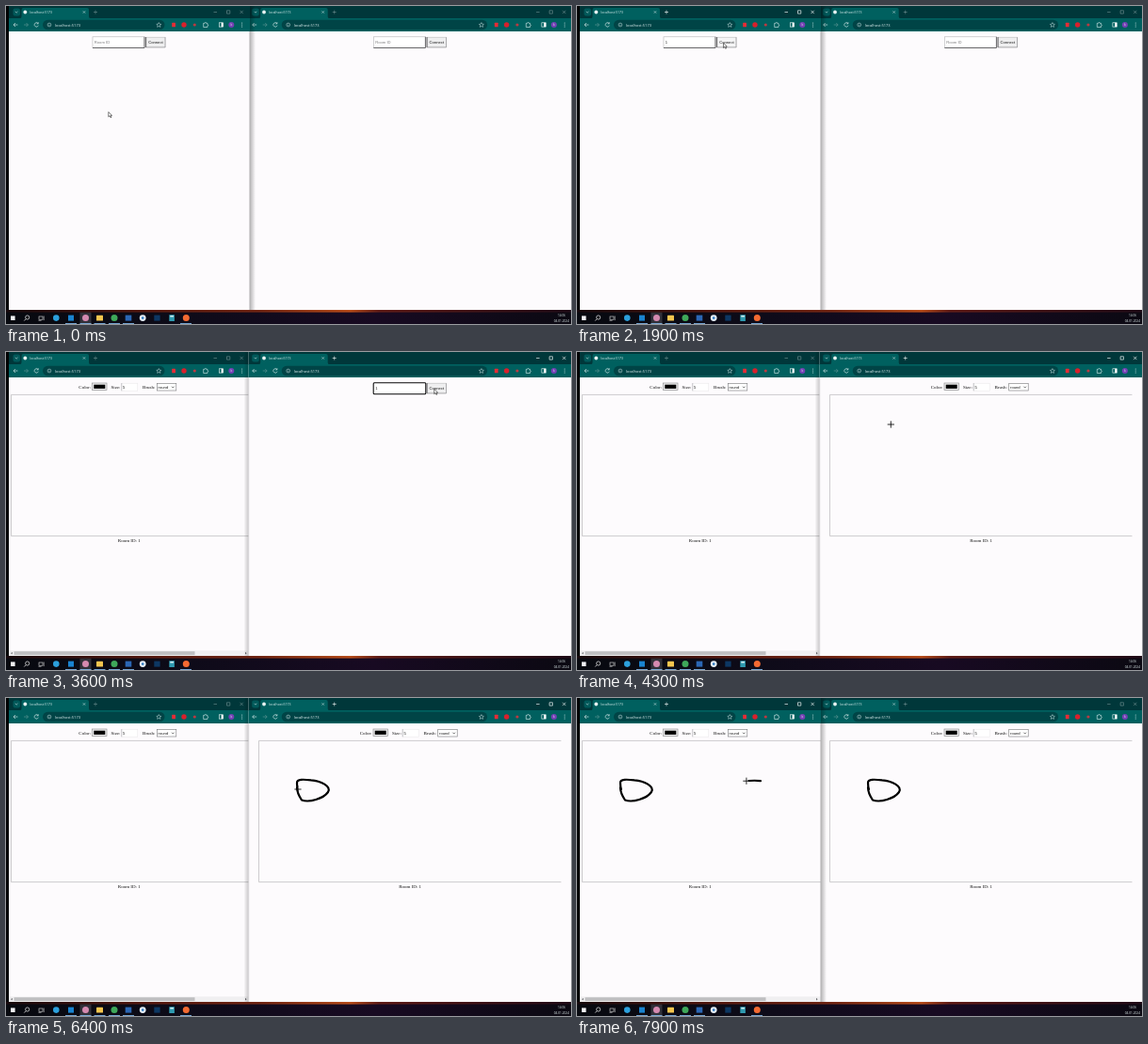
An HTML page that plays this animation: 600x338 px, repeating every 8000 ms.

```html
<!DOCTYPE html>
<html lang="en">
<head>
<meta charset="utf-8">
<title>Shared drawing room</title>
<style>
  html, body { margin: 0; width: 100%; height: 100%; overflow: hidden; background: #000; }
  svg { display: block; width: 100vw; height: 100vh; }
  text { white-space: pre; }
  .ui { font-family: "Open Sans", "Noto Sans", sans-serif; fill: #e4f1f1; }
  .form { font: 4.17px "Liberation Sans", Arial, sans-serif; }
  .page { font: 5px "Liberation Serif", "Times New Roman", serif; fill: #111; }
</style>
</head>
<body>
<svg id="stage" viewBox="0 0 600 338" preserveAspectRatio="none" xmlns="http://www.w3.org/2000/svg"></svg>
<script>
const LOOP = 8000;
const stage = document.getElementById('stage');

// Markup helpers
const rect = (x, y, w, h, fill, more = '') =>
  `<rect x="${x}" y="${y}" width="${w}" height="${h}" fill="${fill}" ${more}/>`;
const dot = (x, y, r, fill, more = '') => `<circle cx="${x}" cy="${y}" r="${r}" fill="${fill}" ${more}/>`;
const line = (d, color, w = 0.6, more = '') =>
  `<path d="${d}" fill="none" stroke="${color}" stroke-width="${w}" ${more}/>`;
const text = (x, y, s, cls, more = '') => `<text x="${x}" y="${y}" class="${cls}" ${more}>${s}</text>`;
const group = (id, body, more = '') => `<g id="${id}" ${more}>${body}</g>`;

const SHAPE = 'M309 95C309 99 311 104 314 108.5C322 111.5 337 107 342 100' +
  'C346 94 334 88 324 87.3C316 86.5 309 86 309 90C309 93 309.3 95 310 97';
const DASH = 'M195 88.2C190 87.4 186 87.7 180 88.2L174 88.8';
const stroke = (id, d, more = '') =>
  line(d, '#000', 2.2, `id="${id}" stroke-linecap="round" stroke-linejoin="round" ${more}`);

// Title strip and toolbar; dx shifts the left-hand items, rx the right-hand ones
function chrome(id, x0, x1, dx, rx) {
  const X = n => n + dx, R = n => n + rx, ink = '#d5e8e8';
  return rect(x0, 0, x1 - x0, 13.5, '#00373a') +
    rect(x0, 13, x1 - x0, 14, '#00605f') +
    rect(X(7.5), 2.5, 7.5, 8, '#00595a', 'rx="2"') +
    line(`M${X(9.8)} 5.8l1.4 1.4l1.4 -1.4`, ink) +
    `<path d="M${X(14.5)} 13.2q2 0 2-2V4q0-2 2-2h67.500q2 0 2 2v7.200q0 2 2 2z" fill="#00605f"/>` +
    dot(X(20.3), 6.5, 1.9, '#e8f2f2') +
    text(X(25.3), 8, 'localhost:5173', 'ui', 'font-size="3.5"') +
    line(`M${X(81.8)} 5.3l2.400 2.400m0 -2.400l-2.400 2.400`, ink, 0.55) +
    group(id + 'Ctl',
      line(`M${X(93)} 6.500h4m-2 -2v4`, '#fff', 0.6) +
      line(`M${R(220.5)} 6.500h3.500M${R(234.5)} 4.800h3.300v3.300h-3.300zM${R(248.5)} 4.800l3.300 3.300m0 -3.300l-3.300 3.300`, '#fff', 0.65)) +
    line(`M${X(12.5)} 20h-4.500m2 -2l-2 2l2 2`, ink, 0.65) +
    line(`M${X(19)} 20h4.500m-2 -2l2 2l-2 2`, '#5d9594', 0.65) +
    line(`M${X(34.2)} 18.700a2.200 2.200 0 1 0 .2 2m-.2 -3.500v1.700h-1.700`, ink, 0.65) +
    rect(X(39), 14.7, R(168.5) - X(39), 10.6, '#004446', 'rx="5.3"') +
    dot(X(46), 20, 1.9, 'none', `stroke="${ink}" stroke-width=".5"`) +
    line(`M${X(46)} 19.700v1.300M${X(46)} 18.700v.4`, ink, 0.5) +
    text(X(52), 21.5, 'localhost:5173', 'ui', 'font-size="4"') +
    line(`M${R(162.3)} 17.600l.75 1.600l1.750 .2l-1.300 1.200l.35 1.750l-1.550 -.9l-1.550 .9l.35 -1.750l-1.300 -1.200l1.750 -.2z`, ink, 0.5) +
    rect(R(176.2), 17.7, 3.8, 4.6, '#e52c36', 'rx=".5"') +
    dot(R(189), 20, 2.7, '#d8202c') +
    dot(R(200.3), 20, 1.6, '#b93a42') +
    line(`M${R(209.7)} 18.300h1.400a.8 .8 0 0 1 1.600 0h1.200v1.300a.8 .8 0 0 1 0 1.600v1.300h-4.200z`, ink, 0.65) +
    rect(R(226.3), 17.8, 4.3, 4.3, 'none', 'stroke="#fff" stroke-width=".6"') +
    rect(R(228.6), 17.8, 2, 4.3, '#fff') +
    dot(R(239.3), 19.9, 3, '#7540b5') +
    text(R(239.3), 21.2, 'k', 'ui', 'font-size="3.4" text-anchor="middle"') +
    [18, 20, 22].map(y => dot(R(250.6), y, 0.5, ink)).join('');
}

// Form for entering the room
function joinForm(id, p) {
  return group(id + 'Join',
    rect(92, 32.8, 55, 11.7, '#fff', 'stroke="#b4b4b6" stroke-width=".6"') +
    line('M92 44.500H147V32.800', '#5b5b5d', 0.9) +
    rect(91.8, 32.8, 55.6, 12, '#fff', `id="${id}Ring" rx="1" stroke="#111" stroke-width="1.1"`) +
    text(93.8, 40.2, 'Room ID', 'form', `id="${id}Hint" fill="#7b7b7d"`) +
    text(93.8, 40.2, '1', 'form', `id="${id}Value" fill="#222"`) +
    line('M93.500 36v5', '#111', 0.4, `id="${id}Caret"`) +
    rect(148.8, 33.2, 20.2, 10.6, '#efeff0', `id="${id}Btn" stroke="#b9b9bb" stroke-width=".6"`) +
    line('M148.600 33v11', '#58585a', 0.9) +
    line('M148.600 44h20.500v-10.800', '#87878a', 0.5) +
    text(158.9, 40.1, 'Connect', 'form', 'text-anchor="middle" fill="#111"'),
    `transform="translate(${p} 0)"`);
}

// Brush settings above the canvas
function tools(p) {
  return `<g transform="translate(${p} 0)">` +
    text(77.3, 38.9, 'Color:', 'page') +
    rect(91.6, 33, 15.4, 7.6, '#efeff0', 'stroke="#858587" stroke-width=".6"') +
    rect(93.3, 34.7, 12, 4.2, '#000') +
    text(111.5, 38.9, 'Size:', 'page') +
    rect(122.8, 33.2, 17, 8, '#fff', 'stroke="#e6e4e7" stroke-width=".5"') +
    line('M122.800 33v8.300', '#a5a5a8', 0.6) +
    text(124, 38.7, '5', 'form', 'fill="#111"') +
    text(145.1, 38.9, 'Brush:', 'page') +
    rect(160.3, 33.6, 20.5, 7.4, '#fff', 'stroke="#77777a" stroke-width=".6"') +
    text(161.6, 38.6, 'round', 'form', 'fill="#111"') +
    line('M176 36.700l1.300 1.300l1.300 -1.300', '#111', 0.6) +
    text(118.8, 201.8, 'Room ID: 1', 'page') + '</g>';
}

const frameLine = d => line(d, '#b9b8bb', 0.7);

const leftWindow = () =>
  rect(259, 0, 6, 323, 'url(#shadeR)') +
  rect(3, 0, 256, 323, '#fdfbfd') +
  chrome('left', 3, 259, 0, 0) +
  joinForm('left', 0) +
  group('leftRoom', tools(0) +
    frameLine('M259 45.400H5.500V195.600H259') +
    stroke('copy', SHAPE, 'transform="translate(-263 0)"') +
    stroke('dash', DASH) +
    rect(3, 317.4, 256, 5.4, '#f0eff1') +
    rect(8.5, 318.2, 192, 3.9, '#bfbfc1') +
    '<path d="M6.700 318.800v2.800l-1.600 -1.400zM254 318.800v2.800l1.600 -1.400z" fill="#66666a"/>') +
  line('M258.700 27V323', '#a9a8ab', 0.6);

const rightWindow = () =>
  rect(252.5, 0, 5, 323, 'url(#shadeL)') +
  rect(257.5, 0, 342.5, 323, '#fdfbfd') +
  chrome('right', 257.5, 600, 253.7, 342.6) +
  joinForm('right', 298.4) +
  group('rightRoom', tools(298.4) +
    frameLine('M589.500 45.400H268.500V195.600H589.500') +
    stroke('blob', SHAPE)) +
  line('M257.700 27V323', '#b3b2b5', 0.5);

function taskbar() {
  const y = 331.6, running = [69, 84.5, 99.5, 115, 130, 191];
  return rect(0, 323, 600, 15, 'url(#bar)') +
    rect(0, 323, 600, 2.6, 'url(#glow)') +
    rect(5, 329.4, 4.6, 4.6, '#f2f2f4') +
    dot(22.7, 331, 2.1, 'none', 'stroke="#eee" stroke-width=".7"') +
    line(`M21.200 332.600l-1.900 1.900`, '#eee', 0.8) +
    rect(35, 330, 4, 3.2, 'none', 'stroke="#ddd" stroke-width=".6"') +
    line('M34.500 334.300h3M40.200 329.500v4.600', '#ddd', 0.6) +
    dot(53.3, y, 3.3, '#2ca0dc') +
    rect(66, 328.6, 6, 6, '#1983d0') +
    rect(78.5, 325.7, 12, 12.3, '#ffffff', 'opacity=".16"') +
    dot(84.5, y, 3.5, '#d58ab0') +
    rect(96, 328.8, 7, 5.6, '#f4c64f', 'rx=".5"') +
    dot(115, y, 3.5, '#3fa85a') +
    rect(126.7, 328.6, 6.6, 6, '#2b67b5') +
    dot(145.2, y, 3.4, '#e6f0f8') + dot(145.2, y, 1.3, '#2a78c0') +
    rect(157.3, 328.6, 6.3, 6, '#0d3763') +
    rect(173.3, 328.2, 5.6, 6.8, '#2f9ab0') +
    rect(174.3, 329, 3.6, 1.5, '#d9f2f5') +
    dot(191.3, y, 3.5, '#f36a32') +
    running.map(x => rect(x - 6, 337.1, 12, 0.9, '#7fb3e2')).join('') +
    text(590, 330.2, '14:06', 'ui', 'font-size="3.2" text-anchor="middle"') +
    text(598, 336, '04.01.2024', 'ui', 'font-size="3.2" text-anchor="end"');
}

const fade = (id, stops) => `<linearGradient id="${id}">` +
  stops.map(([o, c, a = 1]) => `<stop offset="${o}" stop-color="${c}" stop-opacity="${a}"/>`).join('') +
  '</linearGradient>';

stage.innerHTML = '<defs>' +
  fade('shadeR', [[0, '#000', 0.28], [1, '#000', 0]]) +
  fade('shadeL', [[0, '#000', 0], [1, '#000', 0.2]]) +
  fade('bar', [[0, '#07090f'], [0.3, '#0d0b18'], [0.65, '#180a22'], [1, '#0b0912']]) +
  fade('glow', [[0, '#16080c'], [0.25, '#54180f'], [0.45, '#6f2412'], [0.61, '#b44a18'], [0.66, '#5e1b16'], [1, '#1f0a16']]) +
  '</defs>' + rect(0, 0, 600, 338, '#020304') + taskbar() +
  group('windows', group('right', rightWindow()) + group('left', leftWindow())) +
  group('pointer',
    group('arrow', '<path d="M0 0V5.200l1.250 -1.150l.95 2l.9 -.4l-.9 -1.950h1.600z" fill="#fff" stroke="#111" stroke-width=".55"/>') +
    group('beam', line('M-1.200 -2.600q1.200 0 1.200 .6q0 -.6 1.200 -.6M0 -2v4M-1.200 2.600q1.200 0 1.200 -.6q0 .6 1.200 .6', '#222', 0.5)) +
    group('cross', line('M-3.600 0h7.200M0 -3.600v7.200', '#111', 0.9)));

const el = id => document.getElementById(id);
const show = (id, on) => el(id).setAttribute('display', on ? 'inline' : 'none');
const clamp = v => Math.min(1, Math.max(0, v));
const between = (t, a, b) => t >= a && t < b;

// Pointer stops: time, x, y
const STOPS = [
  [0, 108.8, 112.6], [80, 108.8, 112.6], [550, 114, 39], [1250, 114, 39], [1800, 155.5, 39.3],
  [2100, 155.5, 39.3], [2800, 402, 37.5], [3250, 402, 37.5], [3650, 457, 39.5], [3850, 457, 39.5],
  [4300, 333.3, 77], [4500, 333.3, 77], [5150, 309, 95], [5380, 309, 95],
  [6400, 310, 97], [6600, 310, 97], [7350, 195, 88.2], [8000, 195, 88.2]
];
const LAG = 40;
const pens = { blob: [5380, 6400], dash: [7650, 8000] };
const size = {};
for (const id in pens) size[id] = el(id).getTotalLength();
const drawn = (id, t) => size[id] * clamp((t - pens[id][0]) / (pens[id][1] - pens[id][0]));

function pointerAt(t) {
  for (const id in pens) {
    if (between(t, ...pens[id])) {
      const p = el(id).getPointAtLength(drawn(id, t));
      return [p.x, p.y];
    }
  }
  const i = Math.max(1, STOPS.findIndex(s => s[0] > t));
  const [t0, x0, y0] = STOPS[i - 1], [t1, x1, y1] = STOPS[i];
  const k = clamp((t - t0) / (t1 - t0)), e = k * k * (3 - 2 * k);
  return [x0 + (x1 - x0) * e, y0 + (y1 - y0) * e];
}

function paintForm(id, t, focus, typed, press, open) {
  const active = between(t, focus, press), filled = t >= typed;
  show(id + 'Join', t < open);
  show(id + 'Room', t >= open);
  show(id + 'Ring', active);
  show(id + 'Hint', !filled);
  show(id + 'Value', filled);
  show(id + 'Caret', active && !filled);
  el(id + 'Btn').setAttribute('fill', between(t, press, open) ? '#f5f5f6' : '#efeff0');
}

function setFront(id) {
  const box = el('windows');
  if (box.lastElementChild.id !== id) box.appendChild(el(id));
}

function paint(t) {
  const focus = t < 600 ? '' : between(t, 2900, 7650) ? 'right' : 'left';
  setFront(focus || 'left');
  for (const id of ['left', 'right']) el(id + 'Ctl').setAttribute('opacity', focus === id ? 1 : 0.42);
  paintForm('left', t, 600, 1000, 1850, 2100);
  paintForm('right', t, 2900, 3300, 3700, 3850);

  for (const id in pens) {
    const n = drawn(id, t - LAG);
    show(id, n > 0);
    el(id).setAttribute('stroke-dasharray', `${n} ${size[id] + 10}`);
  }
  show('copy', t >= 6600);

  const [x, y] = pointerAt(t);
  const inField = y > 33 && y < 45 &&
    (t < 2100 && x > 92 && x < 147 || t < 3850 && x > 390 && x < 446);
  const onCanvas = y > 45.4 && y < 195.6 &&
    (t >= 3850 && x > 268 && x < 590 || t >= 2100 && x > 5 && x < 258);
  show('beam', inField);
  show('cross', onCanvas);
  show('arrow', !inField && !onCanvas);
  el('pointer').setAttribute('transform', `translate(${x} ${y})`);
}

const start = performance.now();
function tick() {
  paint((performance.now() - start) % LOOP);
  requestAnimationFrame(tick);
}
paint(0);
requestAnimationFrame(tick);
</script>
</body>
</html>
```
